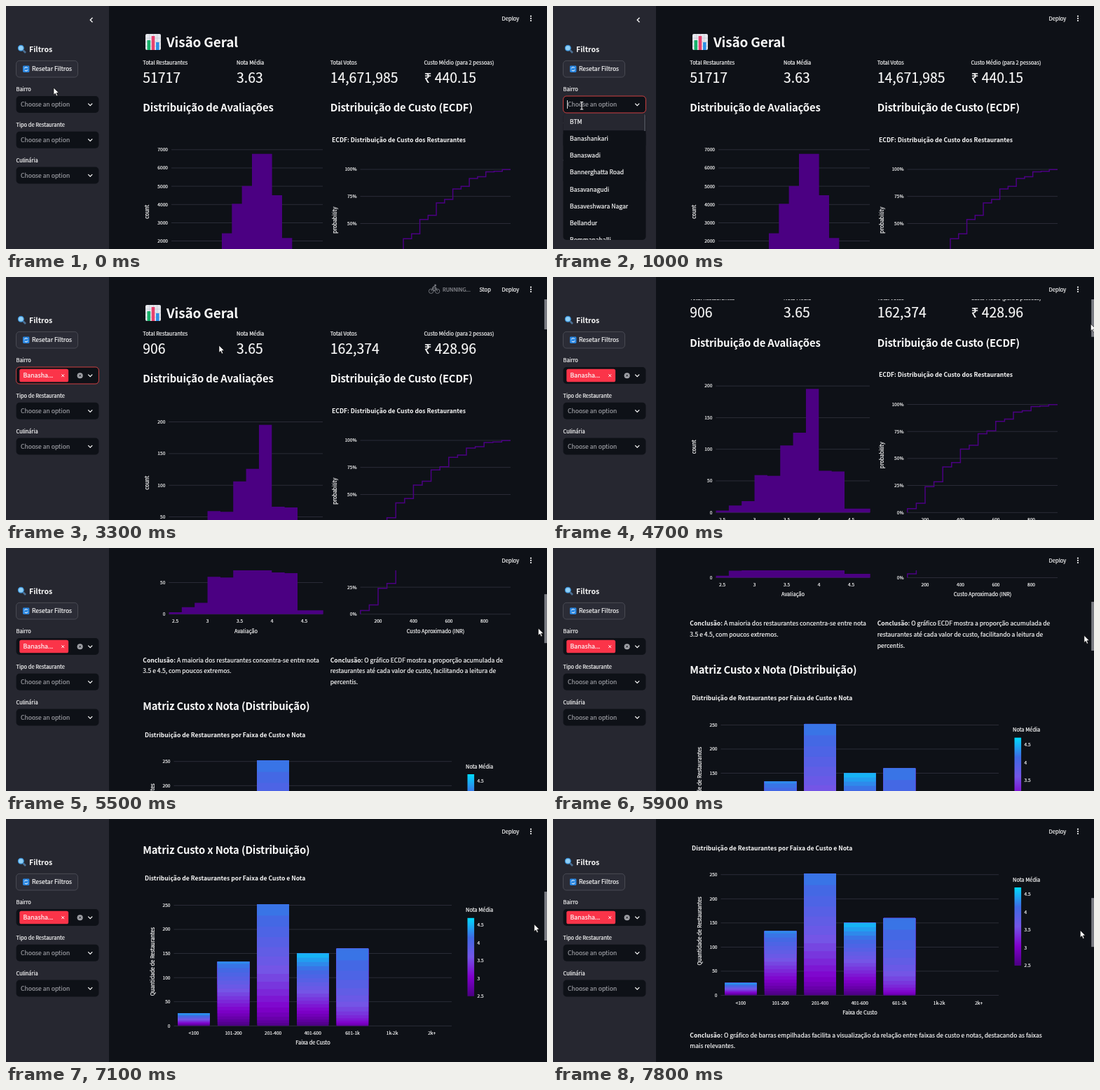
Animation of 772x348 px, one loop 8 s. Source, as an HTML page with a canvas:

```html
<!DOCTYPE html>
<html lang="pt">
<head>
<meta charset="utf-8">
<title>Visão Geral</title>
<style>
html, body { margin: 0; width: 100%; height: 100%; overflow: hidden; background: #0e1117; }
canvas { display: block; width: 772px; height: 348px; }
</style>
</head>
<body>
<canvas id="stage"></canvas>
<script>
const W = 772, H = 348, LOOP = 8000, STEP = 100;
const FONT = '"Noto Sans CJK JP", "Noto Sans CJK SC", "Noto Sans", sans-serif';
const BG = '#0e1117', PANEL = '#262730', INK = '#fafafa', RED = '#ff4b4b', INDIGO = '#4b0082', GRID = '#31333f';
const BODY = 8.58, LABEL = 7.45, TICK = 6.6;
const OPEN = 700, PICK = 1900, METRICS = 2600, CHARTS = 2800, BLUR = 3500, DONE = 3800;
const DRAG = 4530, SLOW = 5500, REST = 7800;
const OPTIONS = ['BTM', 'Banashankari', 'Banaswadi', 'Bannerghatta Road', 'Basavanagudi',
  'Basaveshwara Nagar', 'Bellandur', 'Bommanahalli'];

const canvas = document.getElementById('stage');
const ctx = canvas.getContext('2d');
const ratio = window.devicePixelRatio || 1;
canvas.width = W * ratio;
canvas.height = H * ratio;

// motion
const mix = (a, b, p) => a + (b - a) * p;
const ramp = (t, from, to) => Math.min(1, Math.max(0, (t - from) / (to - from)));
const easeOut = (p, power) => 1 - (1 - p) ** power;

const LEGS = [
  { from: 0, to: 700, x: 41, y: 142 },
  { from: 1000, to: 1700, x: 46, y: 188 },
  { from: 1900, to: 3300, x: 304, y: 98 },
  { from: 3300, to: 4200, x: 771, y: 54 }
];
const scrollAt = t => 294 * ramp(t, DRAG, SLOW) + 226 * easeOut(ramp(t, SLOW, REST), 1.38);

function pointerAt(t) {
  const scroll = scrollAt(t);
  if (t > 4400) return [769 - scroll * 0.032, 57 + scroll * 0.197];
  let x = 68, y = 117;
  for (const leg of LEGS) {
    const p = easeOut(ramp(t, leg.from, leg.to), 3);
    x = mix(x, leg.x, p);
    y = mix(y, leg.y, p);
  }
  return [x, y];
}

// drawing helpers
function text(s, x, y, size, { bold, align = 'left', color = INK, track = 0 } = {}) {
  ctx.font = `${bold ? 'bold ' : ''}${size}px ${FONT}`;
  ctx.textAlign = align;
  ctx.letterSpacing = `${track * size}px`;
  ctx.fillStyle = color;
  ctx.fillText(s, x, y);
  if (!bold) {
    ctx.strokeStyle = color;
    ctx.lineWidth = 0.2;
    ctx.strokeText(s, x, y);
  }
  return ctx.measureText(s).width;
}
const heading = (s, x, y, size = 14.8) => text(s, x, y, size, { bold: true, track: -0.009 });
const centered = (s, x, y, size) => text(s, x, y, size, { align: 'center' });

function upright(s, x, y) {
  ctx.save();
  ctx.translate(x, y);
  ctx.rotate(-Math.PI / 2);
  centered(s, 0, 2.5, LABEL);
  ctx.restore();
}
function rect(x, y, w, h, color) {
  ctx.fillStyle = color;
  ctx.fillRect(x, y, w, h);
}
function paint(fill, stroke, width = 0.8) {
  if (fill) { ctx.fillStyle = fill; ctx.fill(); }
  if (stroke) { ctx.strokeStyle = stroke; ctx.lineWidth = width; ctx.stroke(); }
}
function box(x, y, w, h, r, fill, stroke) {
  ctx.beginPath();
  ctx.roundRect(x, y, w, h, r);
  paint(fill, stroke);
}
function circle(x, y, r, fill, stroke, width) {
  ctx.beginPath();
  ctx.arc(x, y, r, 0, 7);
  paint(fill, stroke, width);
}
function line(points, color, width) {
  ctx.beginPath();
  points.forEach(([x, y]) => ctx.lineTo(x, y));
  paint(null, color, width);
}
function cross(x, y, r, color, width) {
  line([[x - r, y - r], [x + r, y + r]], color, width);
  line([[x - r, y + r], [x + r, y - r]], color, width);
}
function gridRow(x0, x1, y, label) {
  rect(x0, y - 0.4, x1 - x0, 0.8, GRID);
  text(label, x0 - 5, y + 2.4, TICK, { align: 'right' });
}

// sidebar
function sidebar(t, mx, my) {
  rect(0, 0, 147, H, PANEL);
  if (mx < 147) line([[123.5, 16.7], [120.2, 20], [123.5, 23.3]], INK, 1.3);

  line([[24.5, 63.5], [28, 67]], '#4c6f92', 2.6);
  circle(21.3, 60.2, 3.9, '#8fd0f7', '#3a91d8', 1.2);
  text('Filtros', 33, 65.5, 10.5, { bold: true });

  box(14.5, 78.4, 88, 23.6, 4.7, '#2b2c36', '#51525b');
  box(24, 85.6, 9.4, 9.4, 1.4, '#2a86e0');
  for (const a of [0.3, 0.3 + Math.PI]) {
    ctx.beginPath();
    ctx.arc(28.7, 90.3, 2.6, a, a + 2.3);
    paint(null, '#fff', 1);
  }
  text('Resetar Filtros', 37, 93.3, BODY);

  const picked = t >= PICK;
  ['Bairro', 'Tipo de Restaurante', 'Culinária'].forEach((label, i) => {
    const y = 129 + i * 50.75;
    const focus = i === 0 && t >= OPEN && t < BLUR;
    text(label, 14.5, y - 7, LABEL);
    box(14.6, y, 117.8, 24, 4.7, BG, focus ? RED : null);
    line([[117.2, y + 10.6], [120.2, y + 13.6], [123.2, y + 10.6]], INK, 1.3);
    if (i === 0 && picked) {
      box(19.3, 131.7, 69.8, 18.6, 2.6, '#fb3449');
      text('Banasha...', 24.5, 144.2, 8.8);
      cross(81.2, 141.2, 1.9, INK, 1);
      circle(105.6, 141.2, 4, '#a3a4aa');
      cross(105.6, 141.2, 1.5, BG, 0.9);
    } else {
      text('Choose an option', 21, y + 15.1, BODY, { color: '#9a9ba1' });
      if (focus) rect(20, 135, 0.9, 12, INK);
    }
  });
  if (t >= OPEN && !picked) dropdown(my);
}

function dropdown(my) {
  const top = 154, row = 24.15;
  const hover = Math.max(0, Math.floor((my - top) / row));
  ctx.save();
  ctx.beginPath();
  ctx.roundRect(14.5, top, 118, 181, 4.7);
  ctx.clip();
  rect(14, top, 120, 182, BG);
  OPTIONS.forEach((name, i) => {
    const y = top + i * row;
    if (i === hover) rect(14, y, 115.5, row, PANEL);
    text(name, 24, y + 15, BODY);
  });
  rect(129.8, top, 2.4, 25, '#44464f');
  ctx.restore();
}

// page
function chartIcon(x, y) {
  box(x, y, 22, 23, 2, '#e6e8ee');
  for (let i = 1; i < 4; i++) {
    rect(x, y + i * 5.7, 22, 0.6, '#b9c3d2');
    rect(x + i * 5.5, y, 0.6, 23, '#b9c3d2');
  }
  rect(x + 2.5, y + 9, 4.6, 14, '#17b169');
  rect(x + 8.7, y + 3, 4.6, 20, '#e8416f');
  rect(x + 15, y + 12, 4.6, 11, '#2d8fe6');
}

function metrics(fresh) {
  const values = fresh
    ? ['906', '3.65', '162,374', '₹ 428.96']
    : ['51717', '3.63', '14,671,985', '₹ 440.15'];
  ['Total Restaurantes', 'Nota Média', 'Total Votos', 'Custo Médio (para 2 pessoas)'].forEach((label, i) => {
    const x = 195.3 + i * 133.7;
    text(label, x, 84.1, LABEL);
    text(values[i], x, 110, 19.4);
  });
}

const ZERO = 388.8;
const ALL = { left: 236, unit: 0.02614, tick: 1000, ticks: 7, x: 308, step: 14.33,
  counts: [2420, 4040, 5010, 6770, 6770, 4510, 2160] };
const ONE = { left: 232.3, unit: 0.906, tick: 50, ticks: 4, x: 232.5, step: 18.35,
  counts: [3, 11, 18, 59, 58, 106, 126, 195.5, 66, 65, 6, 6] };

// staircase through the given levels
function stairs(levels, x, step, unit) {
  const points = [[x, ZERO]];
  levels.forEach((v, i) => {
    const y = ZERO - v * unit;
    points.push([x + i * step, y], [x + (i + 1) * step, y]);
  });
  return points;
}

function axis(first, gap, x, pitch, count, title, mid) {
  for (let i = 0; i < count; i++) centered(String(first + i * gap), x + i * pitch, ZERO + 12.4, TICK);
  centered(title, mid, ZERO + 26.8, LABEL);
}

function histogram({ left, unit, tick, ticks, x, step, counts }) {
  for (let i = 0; i <= ticks; i++) gridRow(left, 452, ZERO - i * tick * unit, String(i * tick));
  ctx.beginPath();
  stairs(counts, x, step, unit).forEach(p => ctx.lineTo(...p));
  ctx.lineTo(x + counts.length * step, ZERO);
  paint(INDIGO);
  axis(2.5, 0.5, 241.5, 46, 5, 'Avaliação', 342.5);
  upright('count', 201.5, 294.7);
}

// round prices are common: large and small jumps alternate along a sine rise
function shares(first, count) {
  const rise = i => mix(first, 1, Math.sin(Math.PI / 2 * Math.min(1, i / (count - 1))) ** 0.95);
  return Array.from({ length: count }, (_, i) => i % 2 ? mix(rise(i - 1), rise(i + 1), 0.25) : rise(i));
}

function ecdf(fresh) {
  text('ECDF: Distribuição de Custo dos Restaurantes', 465, 195, 8.6, { bold: true });
  for (let i = 0; i <= 4; i++) gridRow(505.5, 720, ZERO - i * 38.7, i * 25 + '%');
  const levels = fresh ? shares(0.035, 17) : shares(0.36, 13);
  const x = fresh ? 505.8 : 567;
  line(stairs(levels, x, (720 - x) / levels.length, 154.5), INDIGO, 1.5);
  axis(200, 200, 531, 50.5, 4, 'Custo Aproximado (INR)', 613);
  upright('probability', 469, 306.7);
}

function conclusion(x, y, lines) {
  const w = text('Conclusão: ', x, y, BODY, { bold: true });
  lines.forEach((s, i) => text(s, i ? x : x + w, y + i * 15.6, BODY));
}

// rating colours, evenly spaced from LOW to HIGH
const COLORS = ['#4b0082', '#8000cc', '#7455e6', '#3f6ae4', '#00dcff'];
const LOW = 2.5, HIGH = 4.7;
function ratingColor(r) {
  const k = ramp(r, LOW, HIGH) * (COLORS.length - 1);
  const i = Math.min(COLORS.length - 2, Math.floor(k));
  const channel = c => Math.round(mix(parseInt(COLORS[i].substr(c, 2), 16),
    parseInt(COLORS[i + 1].substr(c, 2), 16), k - i));
  return `rgb(${[1, 3, 5].map(channel)})`;
}

const BARS = [
  { label: '<100', total: 25.5, best: 4.5, bend: 0.8 },
  { label: '101-200', total: 133, best: 4.35, bend: 0.8 },
  { label: '201-400', total: 252, best: 4.3, bend: 0.58 },
  { label: '401-600', total: 150, best: 4.6, bend: 0.8 },
  { label: '601-1k', total: 160, best: 4.3, bend: 0.35 },
  { label: '1k-2k' }, { label: '2k+' }
];

function stackedBars() {
  const zero = 772.5, unit = 0.691;
  text('Distribuição de Restaurantes por Faixa de Custo e Nota', 198, 564.6, 8.6, { bold: true });
  for (let v = 0; v <= 250; v += 50) gridRow(239.5, 636, zero - v * unit, String(v));
  BARS.forEach(({ label, total, best, bend }, i) => {
    const x = 267.9 + i * 56.63;
    centered(label, x, zero + 13.2, TICK);
    if (!total) return;
    // each rating covers the stack from its own start up to the top
    for (let r = LOW; r <= best; r += 0.1) {
      const start = ((r - LOW) / (best - LOW)) ** (1 / bend);
      rect(x - 22.7, zero - total * unit, 45.4, total * unit * (1 - start), ratingColor(r));
    }
  });
  centered('Faixa de Custo', 438, zero + 27, LABEL);
  upright('Quantidade de Restaurantes', 209, 680.3);

  text('Nota Média', 656, 609.7, LABEL);
  const fade = ctx.createLinearGradient(0, 730, 0, 618);
  COLORS.forEach((c, i) => fade.addColorStop(i / (COLORS.length - 1), c));
  rect(658.5, 618, 9.6, 112, fade);
  for (let i = 0; i < 5; i++) text(String(2.5 + i / 2), 672.5, 732.4 - i * 25.5, TICK);
}

function page(t, scroll) {
  const fresh = t >= CHARTS;
  ctx.save();
  ctx.beginPath();
  ctx.rect(147, 32, W - 147, H - 32);
  ctx.clip();
  ctx.translate(0, -scroll);
  chartIcon(199, 40);
  heading('Visão Geral', 229, 58.8, 19);
  metrics(t >= METRICS);
  heading('Distribuição de Avaliações', 195.3, 151.3);
  heading('Distribuição de Custo (ECDF)', 462.7, 151.3);
  histogram(fresh ? ONE : ALL);
  ecdf(fresh);
  conclusion(195.3, 457.7, ['A maioria dos restaurantes concentra-se entre nota',
    '3.5 e 4.5, com poucos extremos.']);
  conclusion(462.7, 457.7, ['O gráfico ECDF mostra a proporção acumulada de',
    'restaurantes até cada valor de custo, facilitando a leitura de', 'percentis.']);
  heading('Matriz Custo x Nota (Distribuição)', 195.3, 526.4);
  stackedBars();
  conclusion(195.3, 832.7, ['O gráfico de barras empilhadas facilita a visualização da relação entre faixas de custo e notas, destacando as faixas',
    'mais relevantes.']);
  ctx.restore();
}

function header(t) {
  text('Deploy', 707.5, 20.8, 7.6);
  for (let i = 0; i < 3; i++) circle(749, 14.6 + i * 3.2, 1.1, INK);
  if (t < CHARTS || t >= DONE) return;
  const gray = '#7d7f86';
  circle(606.6, 20.3, 3.2, null, gray, 0.9);
  circle(615.6, 20.3, 3.2, null, gray, 0.9);
  line([[606.6, 20.3], [609, 15.8], [613.4, 16.2], [611, 20.3], [609, 15.8]], gray, 0.9);
  line([[615.6, 20.3], [613, 14.6], [610.6, 13.4], [608.4, 15.6]], gray, 1.1);
  circle(612.6, 12, 1.4, gray);
  text('RUNNING...', 623, 20.6, LABEL, { color: '#8f9096' });
  text('Stop', 675.5, 20.8, 7.6);
}

function scrollbar(scroll) {
  const top = 5 + scroll * 0.208, y = Math.max(32, top);
  rect(768.2, y, 3.8, top + 70 - y, '#7b7d84');
}

function pointer(t, x, y) {
  const inside = x > 14 && x < 133;
  ctx.save();
  ctx.translate(x, y);
  if (inside && y > 129 && y < 153) {
    for (const end of [-4.5, 6]) line([[-2.2, end], [2.2, end]], INK, 1);
    line([[0, -4.5], [0, 6]], INK, 1.1);
  } else if (inside && y >= 154 && t < PICK) {
    box(-1.2, 0, 2.4, 8, 1.2, '#fff', '#000');
    box(-2.5, 5, 8, 7, 2, '#fff', '#000');
  } else {
    ctx.beginPath();
    [[0, 0], [0, 10.2], [2.3, 8.1], [4, 12], [5.7, 11.2], [4.1, 7.5], [7.2, 7.3]].forEach(p => ctx.lineTo(...p));
    ctx.closePath();
    paint('#fff', '#000', 0.6);
  }
  ctx.restore();
}

function draw(now) {
  const t = Math.floor((now % LOOP) / STEP) * STEP;
  const [mx, my] = pointerAt(t), scroll = scrollAt(t);
  ctx.setTransform(ratio, 0, 0, ratio, 0, 0);
  rect(0, 0, W, H, BG);
  page(t, scroll);
  header(t);
  sidebar(t, mx, my);
  if (mx >= 147) scrollbar(scroll);
  pointer(t, mx, my);
}

const start = performance.now();
function tick() {
  draw(performance.now() - start);
  requestAnimationFrame(tick);
}
tick();
</script>
</body>
</html>
```
